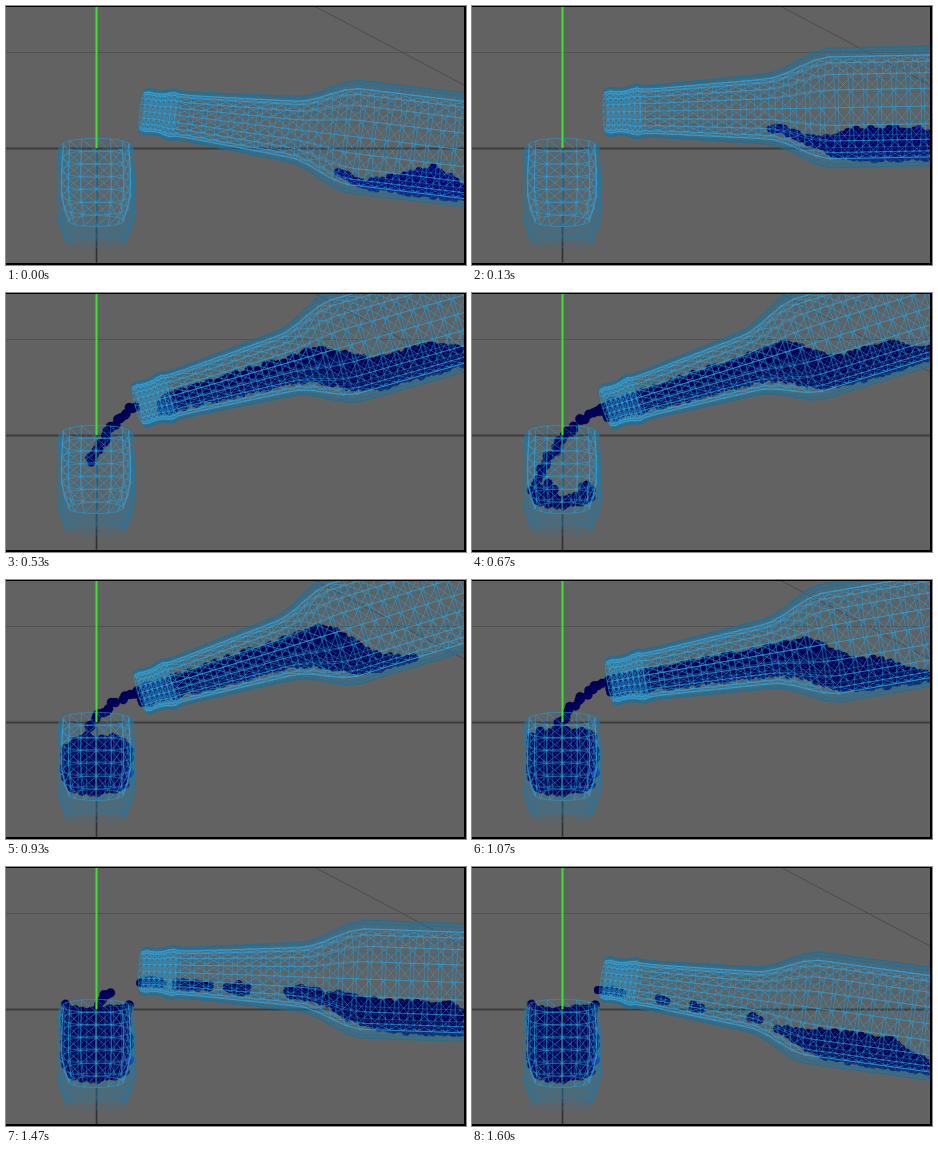
Animation, 460 px wide and 259 px high, one loop 1670 ms. Source, as an HTML page with a canvas:

```html
<!DOCTYPE html>
<html lang="en">
<head>
<meta charset="utf-8">
<title>Pouring bottle wireframe</title>
<style>
  html, body { margin: 0; width: 100%; height: 100%; overflow: hidden; background: #626262; }
  canvas { display: block; width: 460px; height: 259px; }
</style>
</head>
<body>
<canvas id="stage" width="460" height="259"></canvas>
<script>
const ctx = document.getElementById('stage').getContext('2d');
const LOOP = 1670;
const AXIS_X = 90.5;
const BOTTLE_LENGTH = 385;

// Key poses: tick (a fifteenth of a second), mouth x, mouth y, tilt in degrees.
const POSES = [
  [0, 136, 105, 6.9], [5, 130, 108, -11.5], [10, 133, 115, -17.2], [14, 134, 113, -17.2],
  [16, 137.5, 101.5, -9.8], [20, 138, 98.5, -3.2], [24, 131, 112, 7.8]
];

const clamp = v => Math.max(0, Math.min(1, v));
const mix = (a, b, p) => a + (b - a) * p;
const bell = (v, center, width) => Math.exp(-(((v - center) / width) ** 2));
const step = (from, to, v) => {
  const p = clamp((v - from) / (to - from));
  return p * p * (3 - 2 * p);
};
const hash = (a, b = 0) => {
  const v = Math.sin(a * 127.1 + b * 311.7 + 7.3) * 43758.5453;
  return v - Math.floor(v);
};

// Radii along the axis of each vessel.
const bottleOuter = s => 22.5 + 0.08 * Math.min(s, 226) + 2 * bell(s, 5, 5) +
  3 * bell(s, 31, 6) + 20 * step(162, 226, s);
const bottleInner = s => bottleOuter(s) * 0.86;
const glassOuter = s => 37 + 2 * Math.sin(Math.PI * s / 98) - 7 * step(74, 98, s);
const glassInner = s => 33.5 + 1.8 * Math.sin(Math.PI * s / 76) - 6 * step(55, 76, s);
const glassLevel = tick => 138 + 80 * Math.exp(-Math.max(0, tick - 8) / 3.5);

function poseAt(tick) {
  let i = 0;
  while (i < POSES.length - 2 && tick >= POSES[i + 1][0]) i++;
  const a = POSES[i], b = POSES[i + 1], before = POSES[i - 1] || a, after = POSES[i + 2] || b;
  const length = b[0] - a[0], p = (tick - a[0]) / length, q = p * p, c = q * p;
  const value = k => {
    const slopeA = (b[k] - before[k]) / (b[0] - before[0]) * length;
    const slopeB = (after[k] - a[k]) / (after[0] - a[0]) * length;
    return mix(a[k], b[k], 3 * q - 2 * c) + slopeA * (c - 2 * q + p) + slopeB * (c - q);
  };
  const angle = value(3);
  // The bottle looks shorter the further it leans from its longest view.
  return { x: value(1), y: value(2), angle, scale: 1 - 0.06 * ((angle + 5) / 12) ** 2 };
}

function line(x1, y1, x2, y2, color, width) {
  ctx.strokeStyle = color;
  ctx.lineWidth = width;
  ctx.beginPath();
  ctx.moveTo(x1, y1);
  ctx.lineTo(x2, y2);
  ctx.stroke();
}

function ball(x, y, r, tick, seed = 0) {
  ctx.fillStyle = seed > 0.99 ? '#1c1ca0' : `rgb(0,0,${Math.round(mix(124, 92, clamp(tick / 5)))})`;
  ctx.strokeStyle = 'rgba(0,0,45,.55)';
  ctx.lineWidth = 0.6;
  ctx.beginPath();
  ctx.arc(x, y, r, 0, 7);
  ctx.fill();
  ctx.stroke();
}

// Triangulated surface of revolution around the local x axis.
function mesh(radius, rings, segments, tilt, color, width) {
  const point = (s, j) => {
    const r = radius(s), a = j / segments * Math.PI * 2;
    return [s + tilt * r * Math.cos(a), r * Math.sin(a)];
  };
  ctx.strokeStyle = color;
  ctx.lineWidth = width;
  ctx.beginPath();
  rings.forEach((s, i) => {
    const r = radius(s), next = rings[i + 1];
    ctx.moveTo(s + tilt * r, 0);
    ctx.ellipse(s, 0, tilt * r, r, 0, 0, Math.PI * 2);
    if (next === undefined) return;
    for (let j = 0; j < segments; j++) {
      for (const end of [j, j + 1]) {
        ctx.moveTo(...point(s, j));
        ctx.lineTo(...point(next, end));
      }
    }
  });
  ctx.stroke();
}

function addProfile(radius, length) {
  for (let s = 0; s <= length; s += 3) ctx.lineTo(s, -radius(s));
  for (let s = length; s >= 0; s -= 3) ctx.lineTo(s, radius(s));
  ctx.closePath();
}

function wall(outer, outerLength, inner, innerLength, color) {
  ctx.fillStyle = color;
  ctx.beginPath();
  addProfile(outer, outerLength);
  ctx.moveTo(0, -inner(0));
  addProfile(inner, innerLength);
  ctx.fill('evenodd');
}

function ringsTo(length, count) {
  return Array.from({ length: count + 1 }, (_, i) => length * i / count);
}
const LIP_RINGS = ringsTo(38, 7);
const BOTTLE_RINGS = LIP_RINGS.concat(ringsTo(BOTTLE_LENGTH - 38, 24).slice(1).map(s => s + 38));

function drawScene() {
  ctx.fillStyle = '#626262';
  ctx.fillRect(0, 0, 460, 259);
  line(0, 46.5, 460, 46.5, '#525252', 1);
  line(308, 0, 460, 80, '#4b4b4b', 1);
  line(0, 142.5, 460, 142.5, '#3c3c3c', 2);
}

// Liquid in the bottle's own frame, measured in fractions of the radius.
function drawPool(tick) {
  const front = Math.max(0, 215 - 24 * tick);
  const back = 380 - 90 * bell(tick, 14, 2.6);
  const neckTop = 0.6 - 0.95 * Math.sin(Math.PI * tick / 25);
  const thin = clamp((tick - 20) / 4);
  for (let s = front, i = 0; s < back; s += 4.2, i++) {
    if (s < 190 && hash(Math.floor(i / 3), 4) < thin * 0.5) continue;
    const body = step(185, 260, s), r = bottleOuter(s);
    const bottom = mix(0.64, 0.9, body);
    const taper = Math.min(clamp((s - front) / 100 + tick / 10), clamp((back - s) / 70 + 0.1));
    const top = mix(bottom, mix(neckTop, 0.33, body), taper);
    const low = r * bottom - 4, high = Math.min(low, r * top + 4);
    const rows = Math.max(1, Math.ceil((low - high) / 5));
    for (let j = 0; j <= rows; j++) {
      const seed = hash(i, j);
      ball(s + seed * 3 - 1.5, mix(high, low, j / rows) + hash(j, i) * 4 - 2, 4, tick, seed);
    }
  }
}

function drawStream(tick, pose) {
  const head = clamp((tick - 6) / 3), tail = clamp((tick - 20.5) / 2.5);
  if (tick >= 23) ball(126, mix(113, 123, tick - 23), 4, tick);
  if (!head) return;
  const startX = pose.x - 3, startY = pose.y;
  const endX = mix(67, 91, clamp((tick - 10) / 8)), endY = glassLevel(tick) + 1;
  const bendX = mix(startX, endX, 0.65), bendY = mix(startY, endY, 0.28);
  const count = Math.round(Math.hypot(endX - startX, endY - startY) / 4);
  for (let k = 0; k <= count; k++) {
    const u = k / count, v = 1 - u;
    if (u > head || u < tail || tail === 1) continue;
    ball(v * v * startX + 2 * u * v * bendX + u * u * endX + hash(k, tick) * 5 - 2.5,
      v * v * startY + 2 * u * v * bendY + u * u * endY + hash(tick, k) * 5 - 2.5, 4.5, tick);
  }
}

// A barrel of balls; while it fills, the splash leaves a hollow in the middle.
function drawFill(tick) {
  const surface = glassLevel(tick) + 3;
  const hollow = clamp((13 - tick) / 3);
  const roundness = mix(14, 2, clamp((tick - 15) / 5));
  for (let y = 211, j = 0; y > surface; y -= 4.7, j++) {
    const half = 31 - 4 * step(195, 212, y);
    for (let i = -6; i <= 6; i++) {
      const across = i / 6, seed = hash(i, j + 40);
      if (y < surface + roundness * across ** 2) continue;
      const x = AXIS_X + half * across + seed * 4 - 2;
      const py = y - 6 * across ** 2 + hash(j, i) * 4 - 2;
      if (hollow && Math.hypot((x - 95) / 16, (py - 180) / 25) < hollow) continue;
      ball(x, py, 4.5, tick, seed);
    }
  }
}

function drawGlass() {
  ctx.save();
  ctx.translate(AXIS_X - 0.5, 139);
  ctx.rotate(Math.PI / 2);
  wall(glassOuter, 98, glassInner, 76, 'rgba(45,120,155,.24)');
  mesh(glassOuter, ringsTo(98, 8), 26, 0.17, 'rgba(35,120,165,.55)', 0.6);
  mesh(glassInner, ringsTo(76, 6), 14, 0.2, 'rgba(50,165,222,.62)', 0.7);
  ctx.restore();
}

function inBottle(pose, paint) {
  ctx.save();
  ctx.translate(pose.x, pose.y);
  ctx.rotate(pose.angle * Math.PI / 180);
  ctx.scale(pose.scale, pose.scale);
  paint();
  ctx.restore();
}

function drawBottle() {
  wall(bottleOuter, BOTTLE_LENGTH, bottleInner, BOTTLE_LENGTH, 'rgba(40,120,160,.36)');
  ctx.fillStyle = 'rgba(50,150,200,.22)';
  ctx.fillRect(0, -23, 37, 46);
  mesh(bottleOuter, BOTTLE_RINGS, 26, 0.11, 'rgba(30,110,150,.5)', 0.6);
  mesh(bottleInner, BOTTLE_RINGS, 18, 0.11, 'rgba(50,165,222,.62)', 0.7);
}

function draw(tick) {
  const pose = poseAt(tick);
  drawScene();
  inBottle(pose, () => drawPool(tick));
  drawFill(tick);
  drawStream(tick, pose);
  line(AXIS_X, 142, AXIS_X, 259, '#303030', 1.6);
  drawGlass();
  inBottle(pose, drawBottle);
  line(AXIS_X, 1, AXIS_X, 142, '#3be32f', 2);
  ctx.fillStyle = '#000';
  ctx.fillRect(0, 0, 460, 1);
  ctx.fillRect(0, 257, 460, 2);
  ctx.fillRect(458, 0, 2, 259);
}

function play() {
  const time = performance.now() % LOOP;
  // Ticks start on whole hundredths of a second.
  draw(Math.floor((Math.floor(time / 10) * 10 + 5) * 3 / 200));
  requestAnimationFrame(play);
}
play();
</script>
</body>
</html>
```
